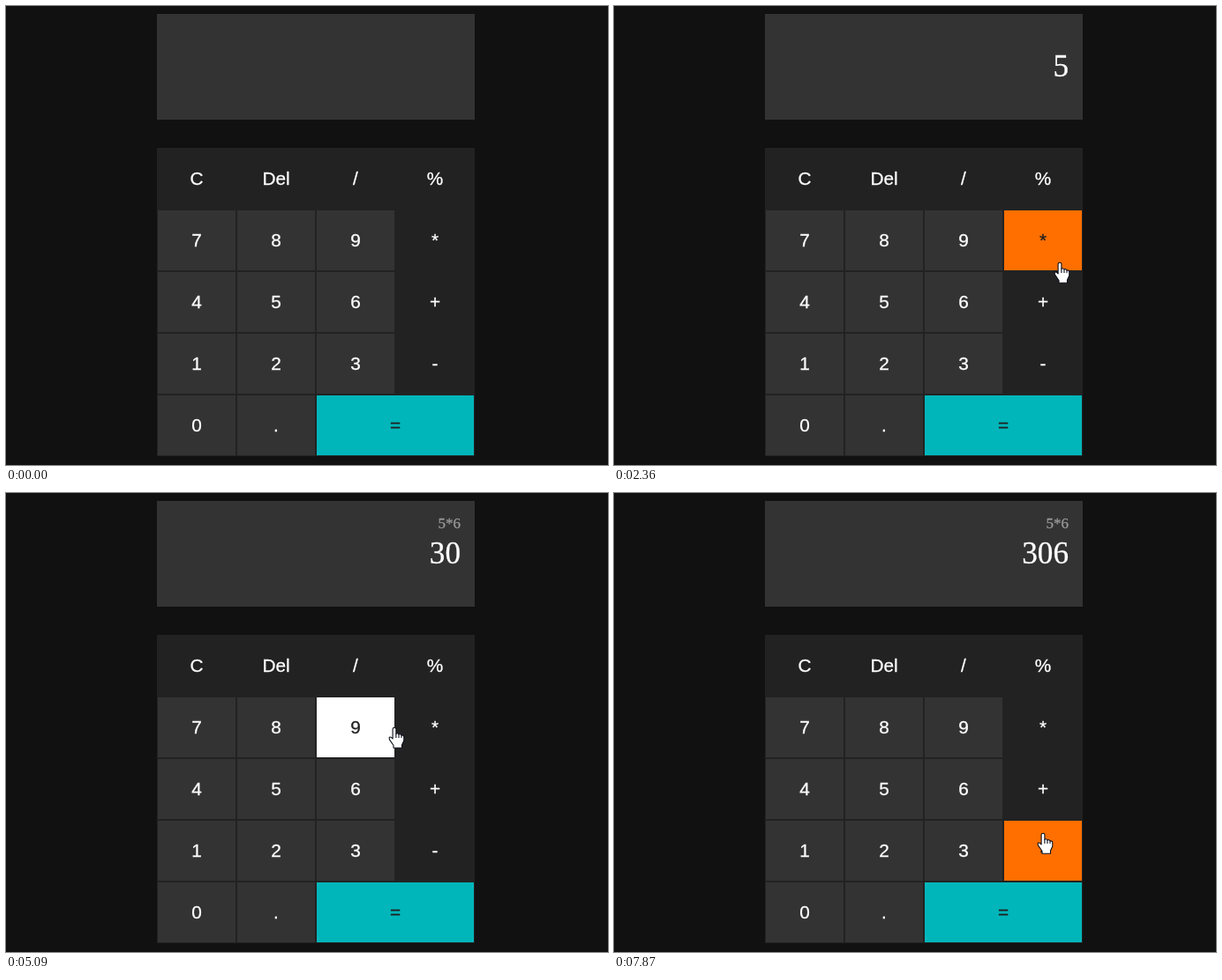
An HTML page with a canvas that plays this animation: 682x521 px, repeating every 8000 ms.

```html
<!DOCTYPE html>
<html lang="en">
<head>
<meta charset="utf-8">
<title>Calculator</title>
<style>
  html, body { margin: 0; width: 100%; height: 100%; overflow: hidden; background: #111; }
  canvas { display: block; }
</style>
</head>
<body>
<canvas id="stage" width="682" height="521"></canvas>
<script>
const ctx = document.getElementById('stage').getContext('2d');
const LOOP = 8000;
const LEFT = 171, TOP = 161, CELL_W = 90, CELL_H = 70;
const SERIF = '"Liberation Serif", "Times New Roman", serif';
const SANS = '"Liberation Sans", Arial, sans-serif';

const keys = [
  ['C', 'Del', '/', '%'],
  ['7', '8', '9', '*'],
  ['4', '5', '6', '+'],
  ['1', '2', '3', '-'],
  ['0', '.', '=']
].flatMap((row, r) => row.map((label, c) => ({
  label,
  x: LEFT + c * CELL_W,
  y: TOP + r * CELL_H,
  w: label === '=' ? CELL_W * 2 : CELL_W,
  digit: /[\d.]/.test(label)
})));

const point = (x, y) => ({ x, y });
const center = label => {
  const key = keys.find(k => k.label === label);
  return point(key.x + key.w / 2, key.y + CELL_H / 2);
};

// Each move passes over the listed keys and comes to rest at a point.
const entrance = point(628, 500);
const moves = [
  { from: 200, to: 1020, over: '-68', rest: point(303, 306) },
  { from: 1800, to: 2360, over: '6+', rest: point(505, 291) },
  { from: 2760, to: 3430, over: '+', rest: point(405, 338) },
  { from: 3560, to: 4180, over: '+-', rest: point(505, 480) },
  { from: 4530, to: 5330, over: '-+*9', rest: point(400, 344) },
  { from: 6200, to: 6710, over: '', rest: point(378, 281) },
  { from: 6750, to: 7870, over: '*+', rest: point(486, 386) }
];
moves.forEach((move, i) => {
  const begin = i ? moves[i - 1].rest : entrance;
  move.points = [begin, ...[...move.over].map(center), move.rest];
});

const presses = [[1360, '5'], [2830, '*'], [3460, '6'], [4320, '='], [5770, '6']];

const hand = new Path2D(`M-1.9 8V2Q-1.9 .3 0 .3T1.9 2V7.2Q3.5 6 5 8Q6.8 6.9 8 9
  Q10.8 8.4 10.8 11V15L8.5 20V23.3H-1V20.5L-5.2 14.4Q-6.6 11.6-5 11Q-3.8 10.7-1.9 13Z`);
const knuckles = new Path2D('M1.9 7V12M5 8V12M8 9V12');
const arrow = new Path2D('M0 0V16.5L3.8 13L6.4 19L9 17.9L6.4 12H11.5Z');

function pointerAt(t) {
  const move = moves.findLast(m => m.from <= t);
  if (!move) return null;
  const legs = move.points.length - 1;
  const progress = Math.min(1, (t - move.from) / (move.to - move.from)) * legs;
  const leg = Math.min(legs - 1, Math.floor(progress));
  const a = move.points[leg], b = move.points[leg + 1], k = progress - leg;
  return point(Math.round(a.x + (b.x - a.x) * k), Math.round(a.y + (b.y - a.y) * k));
}

function readoutAt(t) {
  let entry = '', previous = '';
  for (const [time, label] of presses) {
    if (time > t) break;
    if (label === '=') {
      previous = entry;
      entry = String(entry.split('*').reduce((a, b) => a * b));
    } else {
      entry += label;
    }
  }
  return { entry, previous };
}

const inside = (p, k) => p && p.x >= k.x && p.x < k.x + k.w && p.y >= k.y && p.y < k.y + CELL_H;

function rect(x, y, w, h, color) {
  ctx.fillStyle = color;
  ctx.fillRect(x, y, w, h);
}

function text(str, x, y, size, family, color, align) {
  ctx.font = `${size}px ${family}`;
  ctx.textAlign = align;
  ctx.fillStyle = ctx.strokeStyle = color;
  ctx.lineWidth = 0.3;
  ctx.fillText(str, x, y);
  ctx.strokeText(str, x, y);
}

function drawKey(key, hovered) {
  const equals = key.label === '=';
  let fill = key.digit ? '#333' : '#222';
  if (hovered) fill = key.digit ? '#fff' : '#ff6f00';
  if (equals) fill = '#00b6ba';
  rect(key.x + 1, key.y + 1, key.w - 2, CELL_H - 2, fill);
  text(key.label, key.x + key.w / 2, key.y + 42, 20.8, SANS, hovered || equals ? '#222' : '#fff', 'center');
}

function drawPointer(p, overKey) {
  ctx.save();
  ctx.translate(p.x, p.y);
  ctx.lineWidth = 1.1;
  ctx.lineJoin = 'round';
  ctx.strokeStyle = '#0b0f1a';
  ctx.fillStyle = '#fff';
  const shape = overKey ? hand : arrow;
  ctx.fill(shape);
  ctx.stroke(shape);
  if (overKey) ctx.stroke(knuckles);
  ctx.restore();
}

function draw(t) {
  const pointer = pointerAt(t);
  const { entry, previous } = readoutAt(t);

  rect(0, 0, 682, 521, '#111');
  rect(LEFT, 9, 360, 120, '#333');
  text(previous, 515, 40, 17, SERIF, '#999', 'right');
  text(entry, 515, 80, 35.2, SERIF, '#fff', 'right');

  rect(LEFT, TOP, 360, 350, '#222');
  const hovered = keys.find(k => inside(pointer, k));
  for (const key of keys) drawKey(key, key === hovered);
  if (pointer) drawPointer(pointer, hovered);
}

const start = performance.now();
function tick() {
  draw((performance.now() - start) % LOOP);
  requestAnimationFrame(tick);
}
tick();
</script>
</body>
</html>
```
